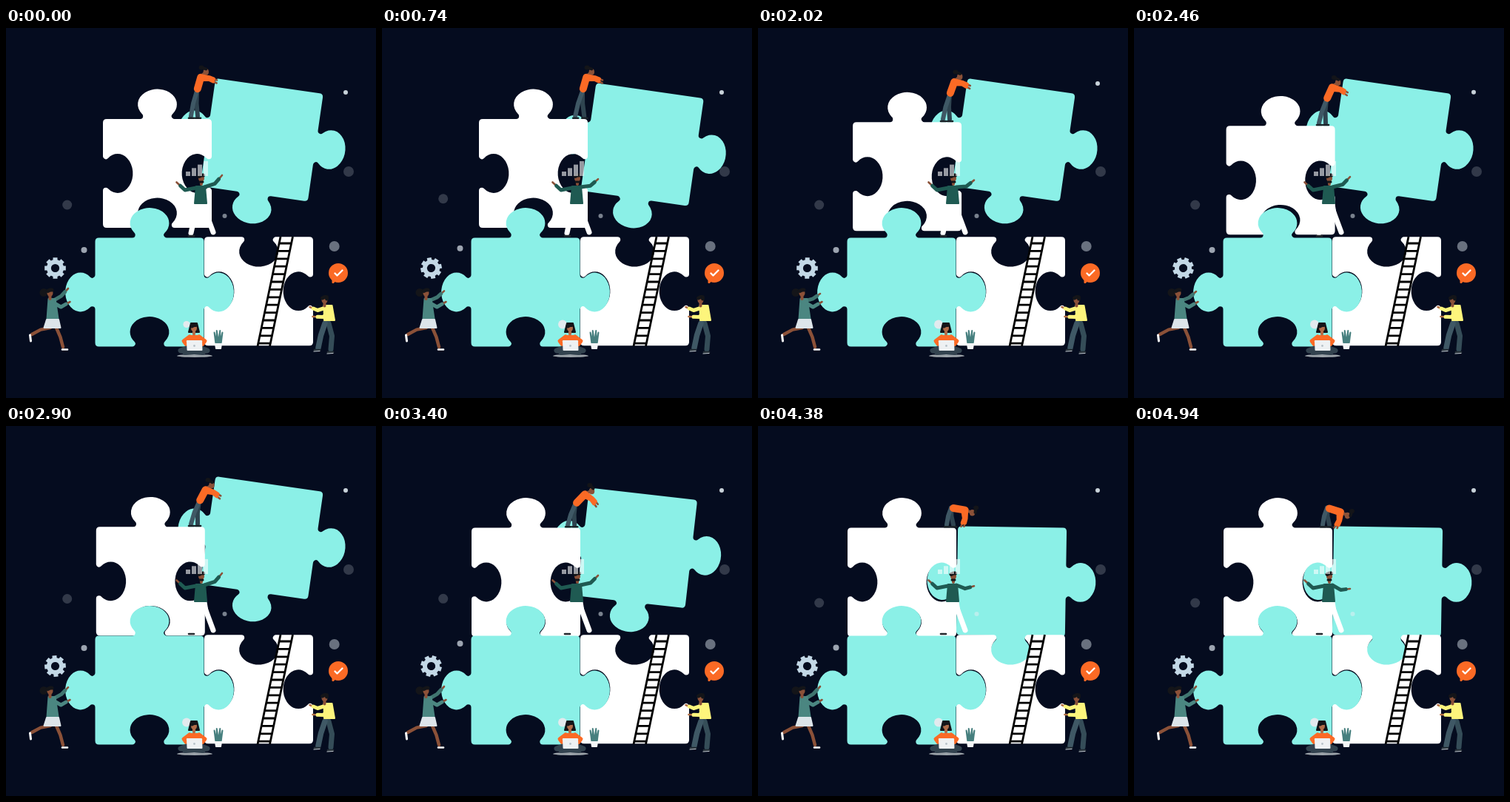
Animation, 500 px wide and 500 px high, one loop 4.96 s. Source, as an HTML page with a canvas:

```html
<!DOCTYPE html>
<html lang="en">
<head>
<meta charset="utf-8">
<title>Puzzle team</title>
<style>
html, body { margin: 0; width: 100%; height: 100%; overflow: hidden; background: #050c1f; }
canvas { display: block; }
</style>
</head>
<body>
<canvas id="stage" width="500" height="500"></canvas>
<script>
const c = document.getElementById('stage').getContext('2d');
const LOOP = 4960, SIDE = 147, TAU = Math.PI * 2, DEG = Math.PI / 180;
const NAVY = '#050c1f', TEAL = '#8bf0e7', WHITE = '#fff', ORANGE = '#fb6a25', YELLOW = '#fdf57c',
  SLATE = '#3f5865', SKIN = '#8b5138', HAIR = '#141519', SHIRT = '#4b8681', GREEN = '#1f5a52', LIGHT = '#e3eaee';

// Motion rules: a smooth step, and a smooth rise and fall
const ease = (t, from, len) => (1 - Math.cos(Math.PI * Math.min(1, Math.max(0, (t - from) / len)))) / 2;
const hop = (t, from, len) => t > from && t < from + len ? Math.sin(Math.PI * (t - from) / len) ** 2 : 0;

// Point at a distance in a clock direction: 0 is up, 90 is right
const step = ([x, y], angle, len) => [x + len * Math.sin(angle * DEG), y - len * Math.cos(angle * DEG)];
const mix = (a, b, k) => a.map((v, i) => v + (b[i] - v) * k);

function oval(color, x, y, rx, ry = rx) {
  c.fillStyle = color;
  c.beginPath();
  c.ellipse(x, y, rx, ry, 0, 0, TAU);
  c.fill();
}
function line(color, width, ...pts) {
  c.beginPath();
  pts.forEach(p => c.lineTo(...p));
  c.strokeStyle = color;
  c.lineWidth = width;
  c.lineCap = c.lineJoin = 'round';
  c.stroke();
}
// Soft trapezoid from a top width to a bottom width
function block(color, [x1, y1], w1, [x2, y2], w2) {
  c.beginPath();
  c.moveTo(x1 - w1 / 2, y1);
  c.lineTo(x1 + w1 / 2, y1);
  c.lineTo(x2 + w2 / 2, y2);
  c.lineTo(x2 - w2 / 2, y2);
  c.closePath();
  c.fillStyle = c.strokeStyle = color;
  c.lineWidth = 2;
  c.lineJoin = 'round';
  c.fill();
  c.stroke();
}
// Elbow or knee, pushed sideways from the middle by bend
function joint(a, b, bend) {
  const dx = b[0] - a[0], dy = b[1] - a[1], len = Math.hypot(dx, dy), m = mix(a, b, .5);
  return [m[0] - dy / len * bend, m[1] + dx / len * bend];
}
function arm(color, shoulder, hand, bend, skin = SKIN) {
  const elbow = joint(shoulder, hand, bend);
  line(skin, 2.6, elbow, hand);
  line(color, 5, shoulder, elbow, mix(elbow, hand, .55));
}
const leg = (color, width, hip, foot, bend) => line(color, width, hip, joint(hip, foot, bend), foot);
const shoe = (color, x, y) => line(color, 2.6, [x - 3, y], [x + 4, y]);

function head([x, y], skin = SKIN) {
  line(skin, 4, [x, y], [x, y + 8]);
  oval(skin, x, y, 4, 5);
  line(HAIR, 5, [x - 3, y - 2.5], [x, y - 4], [x + 2.5, y - 4]);
}

// Sides run top, right, bottom, left: 1 is a tab, -1 a notch, 0 flat
function piece(color, cx, cy, sides, turn = 0) {
  const m = SIDE / 2, neck = 23.3, r = 4;
  c.save();
  c.translate(cx, cy);
  c.rotate(turn);
  c.translate(-m, -m);
  c.beginPath();
  c.moveTo(5, 0);
  for (const s of sides) {
    if (s) {
      c.arc(m - neck, -r * s, r, s * Math.PI / 2, -.8 * s, s > 0);
      c.ellipse(m, -19.8 * s, 26.4, 20.6, 0, (Math.PI - .68) * s, .68 * s, s < 0);
      c.arc(m + neck, -r * s, r, s * (Math.PI + .8), s * Math.PI / 2, s > 0);
    }
    c.lineTo(SIDE - 5, 0);
    c.quadraticCurveTo(SIDE, 0, SIDE, 5);
    c.translate(SIDE, 0);
    c.rotate(Math.PI / 2);
  }
  c.closePath();
  c.fillStyle = color;
  c.fill();
  c.restore();
}

function ladder() {
  const railX = y => 371 - 31 * (y - 282) / 148;
  c.lineCap = 'butt';
  c.strokeStyle = '#000';
  c.lineWidth = 2.8;
  c.beginPath();
  for (const dx of [0, 16.5]) {
    c.moveTo(railX(282) + dx, 282);
    c.lineTo(railX(430) + dx, 430);
  }
  for (let y = 291; y < 430; y += 10.4) {
    c.moveTo(railX(y), y);
    c.lineTo(railX(y) + 16.5, y);
  }
  c.stroke();
}

function gear(t) {
  c.save();
  c.translate(66.5, 324.5);
  c.rotate(t / 1000 * Math.PI / 4);
  c.fillStyle = '#c3d8e6';
  for (let i = 0; i < 8; i++) {
    c.fillRect(-3, -14.3, 6, 7);
    c.rotate(Math.PI / 4);
  }
  oval('#c3d8e6', 0, 0, 11.5);
  oval(NAVY, 0, 0, 5.6);
  c.restore();
}

function bubble() {
  oval(ORANGE, 449, 331, 13);
  block(ORANGE, [444, 339], 5, [442, 344], 1);
  line(WHITE, 2.4, [444.5, 331.5], [447.5, 334.5], [454.5, 327.5]);
}

// One lean angle carries the torso, head, bun and hands
function climber(t, floor, sway, settle, drop) {
  const lean = 16 + 13 * settle + 64 * drop + 15 * ease(t, 3900, 1040);
  const hip = [258 + 2.1 * sway + 3 * settle, floor - 38 + 5 * settle + 6 * drop];
  const shoulder = step(hip, lean, 21);
  const face = step(shoulder, 38 + .75 * lean, 8.5);
  const bun = step(face, lean - 63, 8.5);
  const hand = step(shoulder, lean + 89, 22);
  const foot = 250 + 1.8 * sway + 5 * drop;
  for (const [dx, color] of [[9 + .5 * sway, '#2f4450'], [0, SLATE]]) {
    leg(color, 6, hip, [foot + dx, floor - 4], 1);
    shoe('#1b2228', foot + dx, floor - 1.3);
  }
  arm(ORANGE, mix(shoulder, hip, .25), step(hand, lean + 170, 4), -3);
  line(ORANGE, 10, step(hip, lean, 3), step(shoulder, lean, -2));
  line(SKIN, 4, shoulder, face);
  oval(SKIN, ...face, 3.7, 4.3);
  oval(HAIR, ...bun, 3.5, 3);
  line(HAIR, 4, bun, step(face, lean - 15, 4));
  arm(ORANGE, shoulder, hand, -1);
}

function middleMan(t) {
  const handY = 199 + 10 * hop(t, 0, 2900) + 21 * ease(t, 2900, 2040);
  line(WHITE, 7, [258, 241], [250, 277]);
  line(WHITE, 7, [267, 241], [280, 276]);
  block(WHITE, [263, 238], 15, [265, 250], 15);
  shoe('#23272c', 250, 281);
  arm(GREEN, [257, 216], [230.5, 208.5], -7);
  arm(GREEN, [268, 215], [292, handY], 4);
  block(GREEN, [263, 214], 12, [263, 237], 16);
  head([264, 203]);
  line(HAIR, 3, [262, 208], [266, 208]);
}

function leftWoman(t) {
  const handY = 352 + 8 * hop(t, 0, 3300);
  leg(SKIN, 4.5, [60, 405], [35, 414], 2);
  leg(SKIN, 4.5, [68, 405], [77, 431], -1);
  line(WHITE, 3, [32.5, 415], [33.5, 423]);
  shoe(WHITE, 79, 434.5);
  arm('#407570', [63, 369], [84, handY], 2);
  block(SHIRT, [62, 366], 9, [63, 393], 15);
  block('#dde5ea', [63, 394], 16, [62.5, 405], 22);
  arm(SHIRT, [62, 370], [86.5, 370], 7);
  oval(HAIR, 51, 357.5, 5.5);
  head([59.5, 358]);
}

function rightMan() {
  const tan = '#b16f45';
  leg('#354d58', 7, [436, 399], [439, 434], -3);
  leg(SLATE, 7.5, [431, 399], [422, 432], 1);
  for (const [x, y] of [[420, 435], [438, 438]]) {
    shoe('#263038', x, y);
    line('#cfd6da', 1.2, [x - 4, y + 2], [x + 4, y + 1.5]);
  }
  arm(YELLOW, [432, 378], [410.5, 377], -4, tan);
  block(YELLOW, [435, 375], 11, [437, 395], 14);
  arm(YELLOW, [439, 380], [414.5, 390], -6, tan);
  head([430.5, 367.5]);
  oval(HAIR, 433.5, 365, 2.5, 3.5);
}

function sittingWoman(t) {
  const tan = '#b06c49';
  oval(LIGHT, 244, 400.5, 4.6 + 1.3 * ease(t, 0, 700));
  oval('#9ba2a8', 255, 443, 24, 2);
  block(HAIR, [254, 399], 8, [254, 411], 14);
  arm(ORANGE, [248, 417], [246, 431], 7, tan);
  arm(ORANGE, [261, 417], [263, 431], -7, tan);
  block(ORANGE, [254.5, 416], 14, [254.5, 432], 18);
  head([254, 405.5], tan);
  for (const side of [-1, 1]) line('#33434f', 7, [254 + 10 * side, 433], [254 + 18 * side, 436], [254 - 12 * side, 438.5]);
  block('#eef1f3', [254.5, 423], 19, [255, 435], 19);
  oval('#b7c1c8', 254.5, 429.5, 1.4);
}

function plant() {
  for (const angle of [-22, -8, 8, 22]) block('#467f7e', step([287, 425], angle, 17 - Math.abs(angle) / 9), 0, [287 + angle / 8, 425], 2);
  block('#f3f5f6', [287, 427], 8, [287, 433], 6);
}

function extras(t) {
  for (let i = 0; i < 4; i++) {
    const h = 6 + 4.7 * i;
    c.fillStyle = 'rgba(255,255,255,.58)';
    c.fillRect(243 + 8 * i, 200 - h, 6, h);
  }
  const dot = (alpha, x, y, r) => oval(`rgba(228,238,244,${alpha})`, x, y, r);
  const half = t % (LOOP / 2);
  dot(.2, 82.7, 239 - 8.5 * hop(half, 50, 1250), 6.5);
  dot(.68, 105.5, 300 - 10 * hop(half, 500, 1500), 4);
  dot(.2, 463, 194, 7);
  dot(.45, 443.7, 295, 7);
  dot(.52, 295.5, 254, 3);
  dot(.88, 459, 87 - 12 * hop(t, 1500, 1000), 3);
}

function draw(now) {
  const t = now % LOOP;
  c.fillStyle = NAVY;
  c.fillRect(0, 0, 500, 500);

  const settle = ease(t, 1320, 1930), drop = ease(t, 3120, 880), sway = 6.5 * hop(t, 0, 1720);
  const leftY = 196.5 + 14.5 * settle;
  piece(TEAL, 345.5 - 3 * drop + sway, 151.2 + 58.8 * drop + sway, [0, 1, 1, 1], (8.2 - 7.3 * drop) * DEG);
  piece(WHITE, 204.5 - 10 * settle, leftY, [1, -1, -1, -1]);
  piece(WHITE, 341.5, 355.7, [-1, -1, 0, -1]);
  piece(TEAL, 194, 357, [1, 1, -1, 1]);
  ladder();

  climber(t, leftY - 73.5, sway, settle, drop);
  middleMan(t);
  extras(t);
  gear(t);
  bubble();
  leftWoman(t);
  rightMan();
  sittingWoman(t);
  plant();
}

const start = performance.now();
function tick() {
  draw(performance.now() - start);
  requestAnimationFrame(tick);
}
tick();
</script>
</body>
</html>
```
